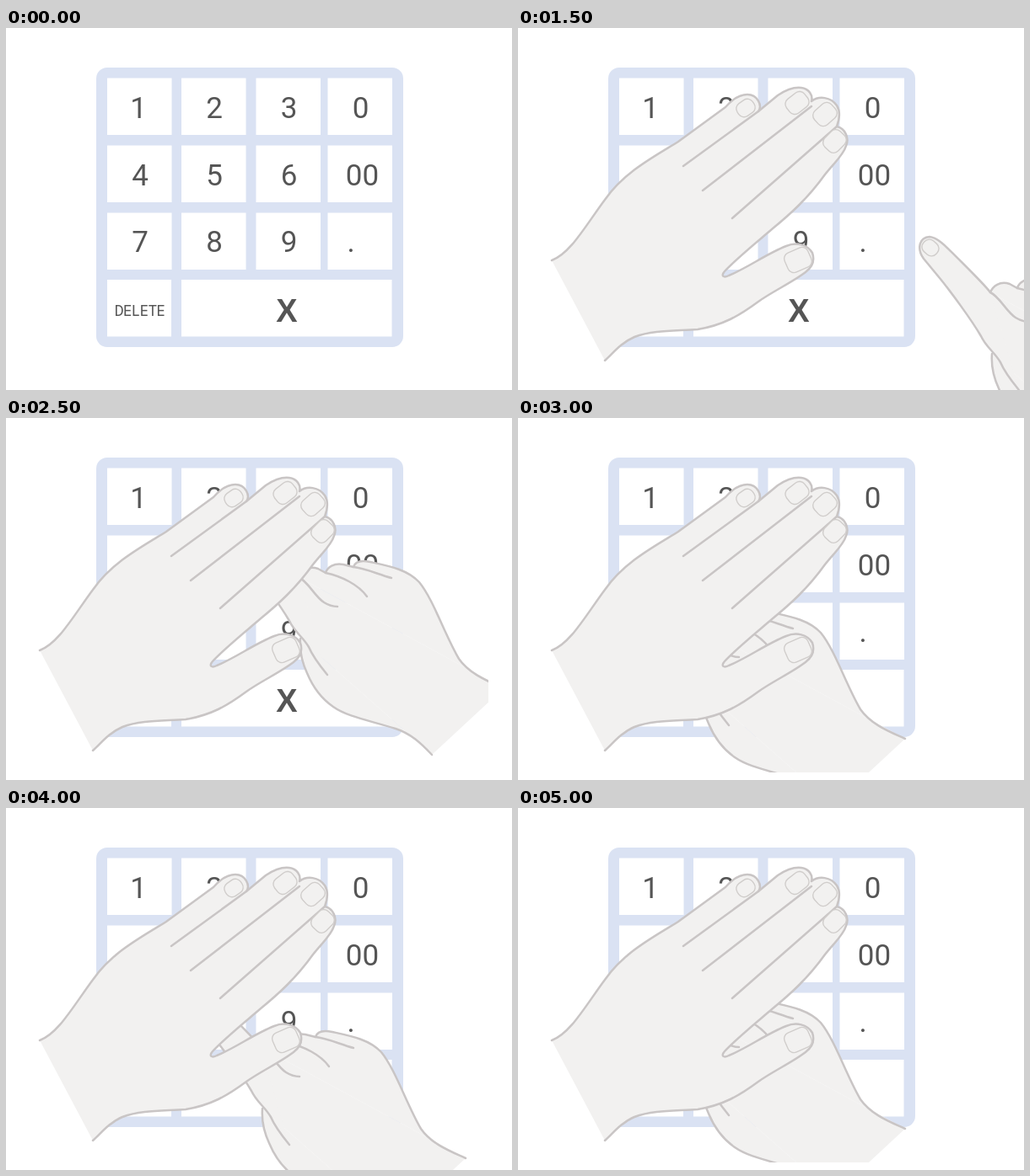
Animation, 600 px wide and 430 px high, one loop 5.5 s. Source, as an HTML page:

```html
<!DOCTYPE html>
<html lang="en">
<head>
<meta charset="utf-8">
<title>Covering the keypad</title>
<style>
  html, body { margin: 0; width: 100%; height: 100%; overflow: hidden; background: #fff; }
  svg { display: block; width: 600px; height: 430px; }
  text { fill: #555; text-anchor: middle; }
  .digit { font: 35px Roboto, sans-serif; }
  .word { font: 18px "Noto Sans Mono", monospace; letter-spacing: -.9px; }
  .cross { font: bold 38px "Liberation Sans", Arial, sans-serif; }
  .hand { fill: #f2f1f0; stroke: #c9c5c5; stroke-width: 2.5; stroke-linecap: round; stroke-linejoin: round; }
  .line { fill: none; }
  .nail { stroke: #d0cdcb; stroke-width: 1.4; }
</style>
</head>
<body>
<svg viewBox="0 0 600 430">
  <clipPath id="clip"><rect id="clipBox" width="600" height="430"/></clipPath>
  <rect x="107" y="47" width="364" height="332" rx="13" fill="#dae2f3"/>
  <g id="keys"></g>

  <g clip-path="url(#clip)">
    <g id="right" class="hand">
      <path stroke="none" d="M505,400 L349,262 347,189 590,321Z"/>
      <path d="M505,400 C492,386 480,375 462,369 C430,359 405,355 388,343 C372,332 362,315 357,303 C350,288 348,275 349,262
        M347,189 C350,182 358,175 370,179 L379,184 C381,177 389,172 400,174 L412,177
        C414,170 422,169 432,171 C455,176 476,180 490,195 C507,216 520,257 537,286 C550,305 575,314 590,321"/>
      <path d="M381,305 C372,294 364,284 359,272 C352,260 342,254 336,241 C325,222 300,188 287,172
        L268,149 C260,138 262,124 275,123 C287,124 300,141 312,152 C327,167 342,182 347,189"/>
      <path class="line" d="M347,189 C358,194 366,212 377,219 Q385,224 393,224
        M379,184 C398,188 418,198 428,212 M412,177 C425,178 442,186 457,190"/>
    </g>
  </g>

  <g id="left" class="hand">
    <path d="M40,276 C62,268 80,235 103,204 C126,171 161,153 190,135 L246,94
      C253,86 262,79 272,79 C284,79 290,92 285,99 L308,80 C317,74 328,70 336,71
      C345,72 350,80 348,87 C357,80 371,82 378,92 C383,100 381,109 378,117
      C388,119 393,131 389,140 C386,151 374,161 364,174 C344,202 323,221 301,239
      C280,257 258,275 245,289 C240,295 244,297 250,294 C272,285 295,268 318,259
      C330,254 343,257 349,267 C352,276 349,284 341,290 C327,301 300,314 285,325
      C262,342 243,353 213,358 C185,360 160,359 138,367 C122,374 113,386 103,395"/>
    <path class="line" d="M196,164 L285,99 M219,193 L348,93 M254,226 L378,117"/>
  </g>
</svg>
<script>
const $ = id => document.getElementById(id);

function add(parent, name, attrs, text = '') {
  const node = document.createElementNS('http://www.w3.org/2000/svg', name);
  for (const key in attrs) node.setAttribute(key, attrs[key]);
  node.textContent = text;
  parent.append(node);
}

function key(x, y, width, label, labelX, baseline, style = 'digit') {
  add($('keys'), 'rect', { x, y, width, height: 67.5, fill: '#fff' });
  add($('keys'), 'text', { x: labelX, y: baseline, class: style }, label);
}

function nail(hand, x, y, w, h, angle) {
  add($(hand), 'rect', {
    x: -w / 2, y: -h / 2, width: w, height: h, rx: 7.5, class: 'nail',
    transform: `translate(${x} ${y}) rotate(${angle})`
  });
}

const columns = [120, 208, 296.5, 381.5];
const nudge = { '1': -2, '00': 2, '.': -11.5 };
['1 2 3 0', '4 5 6 00', '7 8 9 .'].forEach((row, r) =>
  row.split(' ').forEach((label, c) => {
    const x = columns[c];
    key(x, 59.5 + 80 * r, 76.5, label, x + 39 + (nudge[label] || 0), 107 + 79.7 * r);
  }));
key(120, 299, 76, 'DELETE', 158.5, 341.5, 'word');
key(208, 299, 249.5, 'X', 333, 349, 'cross');

nail('right', 276, 136, 20, 17, 42);
nail('left', 270, 95, 22, 18, -35);
nail('left', 331, 89, 27, 21, -38);
nail('left', 364, 102.5, 27, 22, -42);
nail('left', 375.5, 134.5, 26, 22, -46);
nail('left', 332, 275.5, 30, 25, -24);

// Each half second: left hand offset, right hand offset, right hand clip size.
const rest = [0, 0], away = [-900, 0];
const lower = [rest, [-45, 95], [600, 430]];
const upper = [rest, [0, 0], [572, 421]];
const side = [rest, [-131, 60], [572, 421]];
const steps = [
  [away, away], [[-316, 87], away], [[-108, 13], away],
  [rest, [213, 125], [600, 430]],
  lower, upper, side, [rest, [-70, 20], [520, 421]],
  lower, upper, side
];

function draw(now) {
  const [left, right, [w, h] = [600, 430]] = steps[Math.floor(now / 500) % steps.length];
  $('left').setAttribute('transform', `translate(${left})`);
  $('right').setAttribute('transform', `translate(${right})`);
  $('clipBox').setAttribute('width', w);
  $('clipBox').setAttribute('height', h);
}

const start = performance.now();
function tick() {
  draw(performance.now() - start);
  requestAnimationFrame(tick);
}
tick();
</script>
</body>
</html>
```
